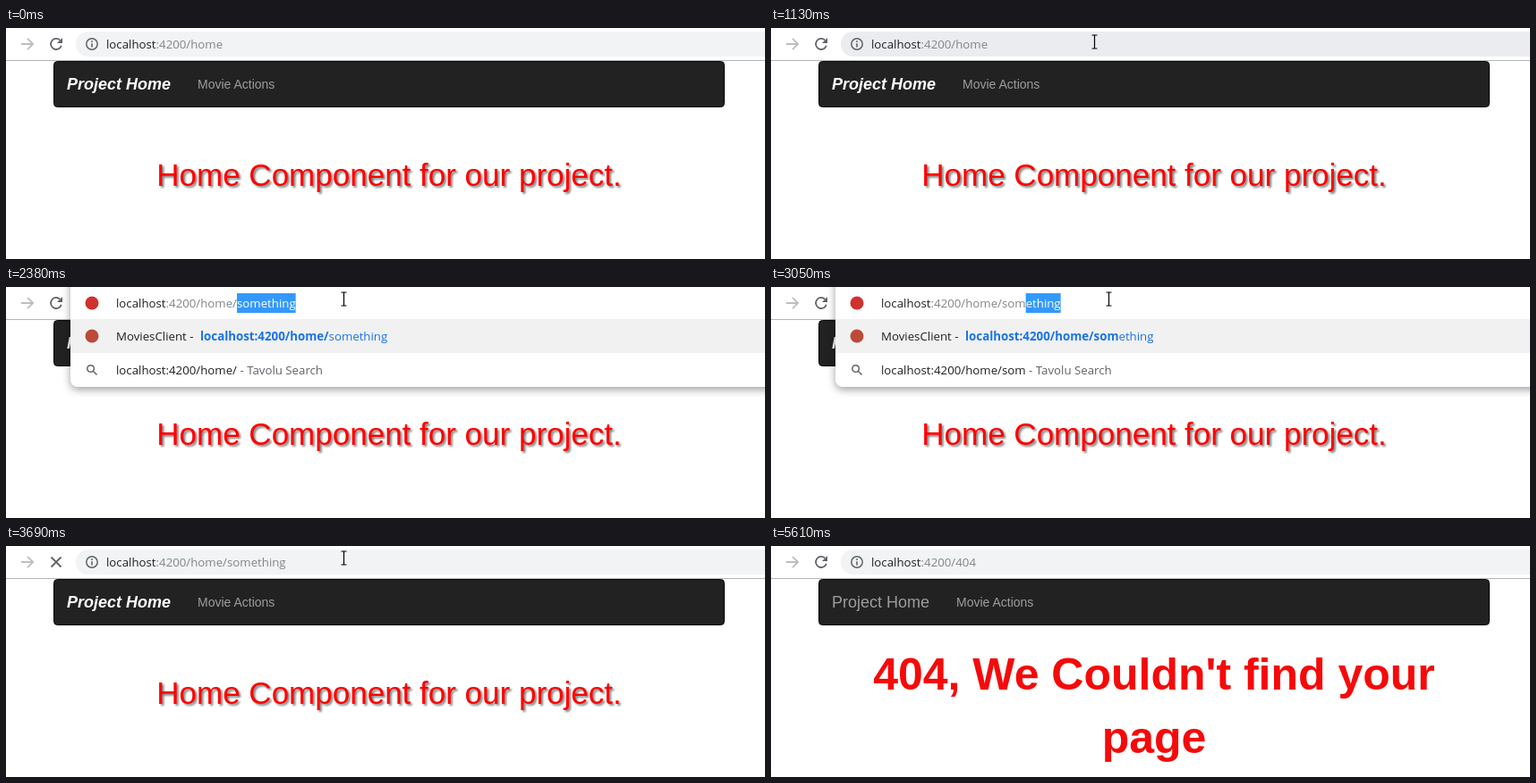
These frames come from a looping animation (848 by 259 pixels, 6.9 s). An HTML page:

```html
<!DOCTYPE html>
<html lang="en">
<head>
<meta charset="utf-8">
<title>Route redirect</title>
<style>
  html, body { margin: 0; width: 100%; height: 100%; overflow: hidden; background: #fff; }
  svg { display: block; width: 848px; height: 259px; }
  text { white-space: pre; font-family: "Liberation Sans", Arial, sans-serif; }
  .ui { font: 13.25px "Open Sans", "Noto Sans", sans-serif; fill: #202124; }
  .ui .dim { fill: #80868b; }
  .ui .note { fill: #5f6368; }
  .ui .link { fill: #1a73e8; }
  .ui .bold { font-weight: 700; font-size: 13.3px; }
  .ui .picked { fill: #fff; }
  .line { fill: none; stroke: #5f6368; stroke-width: 1.8; }
  .brand { font-size: 18px; }
  .nav { font-size: 14px; fill: #9d9d9d; }
  .title { font-size: 35px; fill: #f00; filter: drop-shadow(2px 2px 1px #808080); }
  .error { font-size: 50px; font-weight: 700; fill: #f50a0a; }
  #panel { fill: #fff; filter: drop-shadow(0 3px 5px rgba(0, 0, 0, .38)); }
</style>
</head>
<body>
<svg viewBox="0 0 848 259">
  <rect y="36" width="848" height="1" fill="#b4b5b6"/>
  <rect x="53.5" y="37.5" width="749" height="51" rx="4" fill="#222" stroke="#080808"/>

  <g id="home">
    <text class="brand" x="68" y="69" fill="#fff" font-weight="700" font-style="italic">Project Home</text>
    <text class="nav" x="214" y="68">Movie Actions</text>
    <text class="title" x="428" y="177" text-anchor="middle">Home Component for our project.</text>
  </g>
  <g id="missing">
    <text class="brand" x="68" y="69" fill="#9d9d9d">Project Home</text>
    <text class="nav" x="207" y="68">Movie Actions</text>
    <text class="error" x="428" y="161" text-anchor="middle">404, We Couldn't find your</text>
    <text class="error" x="428" y="232" text-anchor="middle">page</text>
  </g>

  <path class="line" style="stroke:#bcbec1" d="M17 18h13M24 11.8l6.2 6.2-6.2 6.2"/>
  <g id="reload">
    <path class="line" d="M60.3 13.7A6 6 0 1 0 61.8 19.7"/>
    <path d="M63 11v6h-6z" fill="#5f6368"/>
  </g>
  <path id="stop" class="line" d="M50.5 12.5l11 11m0-11l-11 11"/>

  <rect id="pill" x="78" y="4" width="800" height="28" rx="14"/>
  <g id="info">
    <circle class="line" cx="96" cy="18" r="6.2" style="stroke-width:1.5"/>
    <path class="line" style="stroke-width:1.6" d="M96 14.3v1.6M96 17.2v4.3"/>
  </g>

  <g id="dropdown">
    <rect id="panel" x="72" y="-30" width="820" height="142" rx="8"/>
    <rect x="72" y="36" width="776" height="38" fill="#f1f1f2"/>
    <circle cx="96" cy="18" r="7.5" fill="#d0312d"/>
    <circle cx="96" cy="55" r="7.5" fill="#bb4a37"/>
    <path class="line" style="stroke-width:1.5" d="M97.3 94.3l4.2 4.2M98.4 91.5a3.8 3.8 0 1 1-7.6 0a3.8 3.8 0 1 1 7.6 0"/>
    <text class="ui" x="123" y="60">MoviesClient - <tspan id="match" class="link bold" x="217"></tspan><tspan id="rest" class="link"></tspan></text>
    <text class="ui" x="123" y="98"><tspan id="query"></tspan><tspan class="note"> - Tavolu Search</tspan></text>
  </g>

  <rect id="selection" y="7" height="22" fill="#3399ff"/>
  <text id="url" class="ui" y="23"><tspan id="host">localhost</tspan><tspan id="path" class="dim"></tspan><tspan id="tail" class="picked"></tspan></text>
  <rect id="caret" y="7" width="1" height="19" fill="#000"/>

  <path id="beam" d="M-3 -7.5h2.5l.5 .5 .5-.5h2.5M0 -7V7M-3 7.5h2.5l.5-.5 .5 .5h2.5" fill="none" stroke="#000" stroke-width="1.2"/>
  <path id="arrow" d="M0 0V16l3.7-3.5 2.4 5.6 2.4-1-2.4-5.5h5.2z" fill="#fff" stroke="#000"/>
</svg>
<script>
const LOOP = 6900;
const el = Object.fromEntries([...document.querySelectorAll('[id]')].map(e => [e.id, e]));
const show = (node, on) => { node.style.display = on ? '' : 'none'; };
const set = (node, attrs) => { for (const k in attrs) node.setAttribute(k, attrs[k]); };
const within = (t, a, b) => t >= a && t < b;

// Each move is shown as a number of held positions along its points.
const moves = [
  { from: 260, to: 830, steps: 10, points: [[573, 189], [500, 125], [420, 68], [365, 28], [353, 20]] },
  { from: 970, to: 1490, steps: 7, points: [[355, 19], [366, 11], [374, 8], [377, 13]] },
  { from: 4220, to: 4350, steps: 3, points: [[380, 19], [394, 48], [418, 91]] },
];

// Address bar contents: start time, typed path, inline completion.
const address = [
  [0, ':4200/home', ''],
  [2300, ':4200/home/', ''],
  [2370, ':4200/home/', 'something'],
  [2860, ':4200/home/s', 'omething'],
  [2950, ':4200/home/so', 'mething'],
  [3050, ':4200/home/som', 'ething'],
  [3610, ':4200/home/something', ''],
  [4920, ':4200/404', ''],
];

function cursorAt(t) {
  if (t < moves[0].from || t >= 4420) return null;
  const { from, to, steps, points } = moves.filter(m => t >= m.from).pop();
  const step = Math.floor(Math.min(1, (t - from) / (to - from)) * (steps - 1) + 1e-6);
  const pos = step / (steps - 1) * (points.length - 1);
  const i = Math.min(points.length - 2, Math.floor(pos));
  return [0, 1].map(k => Math.round(points[i][k] + (points[i + 1][k] - points[i][k]) * (pos - i)));
}

function drawCursor(t) {
  const at = cursorAt(t);
  const overText = at && (at[1] < 33 || at[1] > 140);
  show(el.beam, at && overText);
  show(el.arrow, at && !overText);
  if (at) set(overText ? el.beam : el.arrow, { transform: `translate(${at[0] + .5} ${at[1] + .5})` });
}

function drawAddress(t) {
  const open = within(t, 2370, 3610);
  const allPicked = within(t, 1230, 1400);
  const [, path, tail] = address.filter(a => t >= a[0]).pop();
  const x = open ? 123 : 112;

  el.path.textContent = path;
  el.tail.textContent = tail;
  el.url.setAttribute('x', x);
  el.host.setAttribute('class', allPicked ? 'picked' : '');
  el.path.setAttribute('class', allPicked ? 'picked' : 'dim');

  const typedEnd = x + el.host.getComputedTextLength() + el.path.getComputedTextLength();
  show(el.selection, allPicked || tail);
  if (allPicked) set(el.selection, { x, width: typedEnd - x });
  else if (tail) set(el.selection, { x: typedEnd, width: el.tail.getComputedTextLength() });

  show(el.caret, within(t, 1400, 1930) || within(t, 2300, 2370));
  el.caret.setAttribute('x', Math.round(typedEnd));

  show(el.dropdown, open);
  show(el.info, !open);
  el.match.textContent = el.query.textContent = 'localhost' + path;
  el.rest.textContent = tail;
}

function drawPill(t) {
  const focused = within(t, 1230, 3610);
  const hovered = within(t, 760, 1230);
  set(el.pill, {
    fill: focused ? '#fff' : hovered ? '#ebecf0' : '#f1f3f4',
    stroke: focused ? '#aecbfa' : 'none',
    'stroke-width': 2,
  });
}

function render(t) {
  const loading = within(t, 3690, 5610);
  show(el.stop, loading);
  show(el.reload, !loading);
  show(el.home, t < 5100);
  show(el.missing, t >= 5100);
  drawPill(t);
  drawAddress(t);
  drawCursor(t);
}

const start = performance.now();
function tick() {
  render((performance.now() - start) % LOOP);
  requestAnimationFrame(tick);
}
tick();
</script>
</body>
</html>
```
